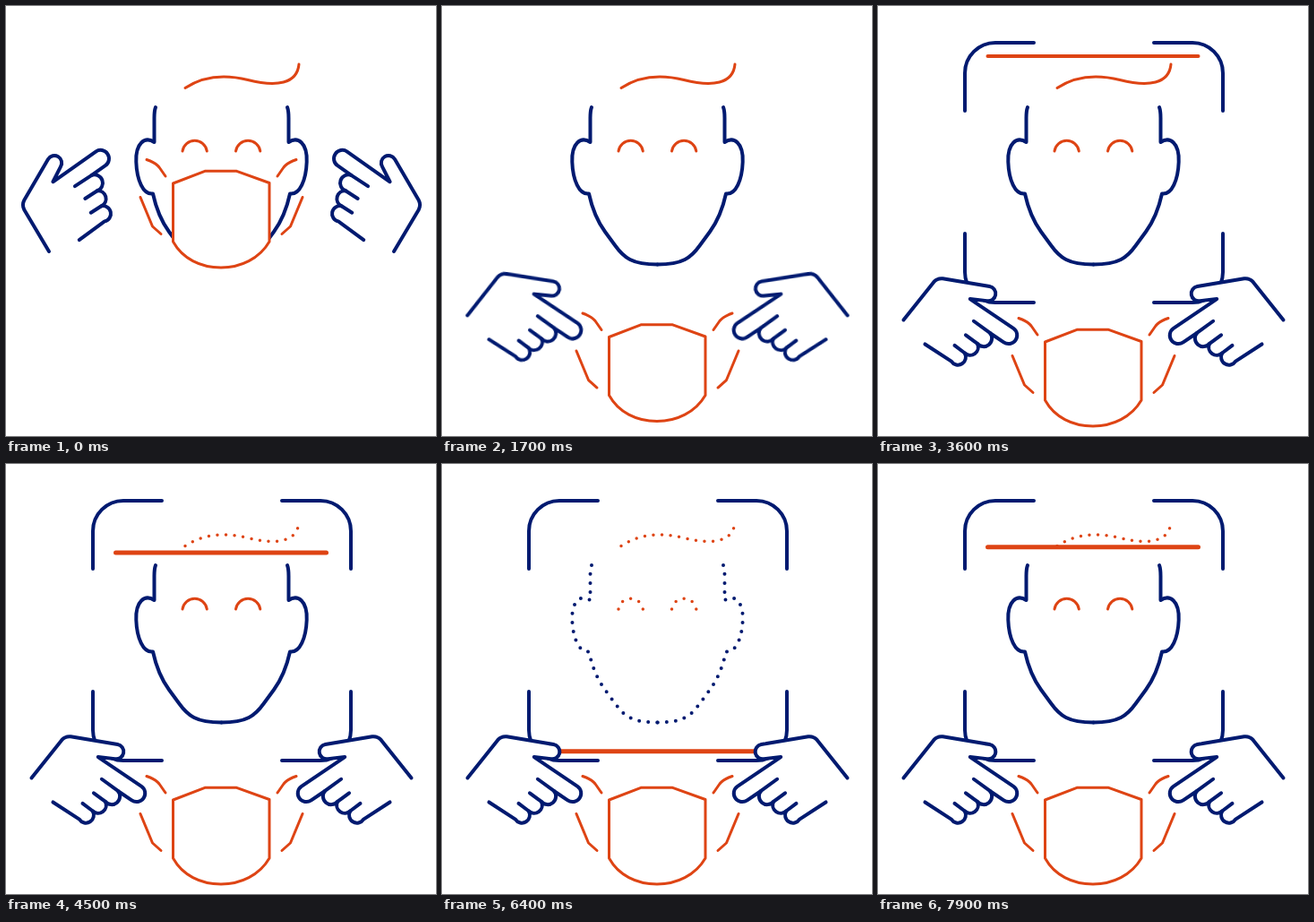
Recreate the animation shown at these times as an HTML page. Size 480x480 px, loop 8 s.

```html
<!DOCTYPE html>
<html lang="en">
<head>
<meta charset="utf-8">
<title>Face scan</title>
<style>
  html, body { margin: 0; width: 100%; height: 100%; overflow: hidden; background: #fff; }
  svg { display: block; width: 100%; height: 100%; }
  .line { fill: none; stroke-linecap: round; stroke-linejoin: round; }
  .navy { stroke: #001a70; stroke-width: 4; }
  .warm { stroke: #de4414; stroke-width: 3; }
  .solid { fill: #fff; }
  .dots * { stroke-dasharray: 0 .999; }
  .dots .warm { stroke-width: 3.500; }
</style>
</head>
<body>
<svg viewBox="0 0 480 480">
  <defs>
    <clipPath id="above"><rect id="aboveBox" width="480" height="56"/></clipPath>
    <clipPath id="below"><rect id="belowBox" width="480" height="480"/></clipPath>

    <path id="half" pathLength="24" d="M167 113Q165.500 117 165.500 125V152C155 145 144.500 153 145.300 174C146 194 153 211 164 209.500C168 228 174 241 182 252L193 267C203 281 212 288.500 240.500 288.500"/>
    <path id="eye" pathLength="4" d="M197 162A13.800 13.800 0 0 1 224.300 162"/>
    <path id="hair" pathLength="14.7" d="M200 91.500C222 77 246 76.500 270 82.500C302 90.500 325 87 327 65"/>
    <g id="face" class="line">
      <g class="navy">
        <use href="#half"/>
        <use href="#half" transform="matrix(-1 0 0 1 481 0)"/>
      </g>
      <g class="warm">
        <use href="#hair"/>
        <use href="#eye"/>
        <use href="#eye" x="59.500"/>
      </g>
    </g>

    <g id="corners">
      <path d="M97 117V75A34 34 0 0 1 131 41H174"/>
      <path d="M97 254V297A34 34 0 0 0 131 331H174"/>
    </g>
    <path id="straps" d="M157 171.500L161 173Q168 176 171 180L178 190M150 213.500L163.500 246L173 254.500"/>
    <path id="arrow" d="M120 155L121 167.500L133 165.500M121 167.500L127.500 159.500"/>
    <g id="hand" class="line navy">
      <path class="solid" d="M28 252L56.500 206Q60 201 66 201L119 203.500A8 8 0 0 1 118 219.800L99 220L151 246.800A9 9 0 0 1 142 263.500L125.500 255A9 9 0 0 1 113 268.500A9 9 0 0 1 100 280.500A8 8 0 0 1 86.500 291.500L55 276"/>
      <path d="M125.500 255L106 244M113 268.500L99 260.500M100 280.500L88 273.500"/>
    </g>
  </defs>

  <rect width="480" height="480" fill="#fff"/>
  <g id="frame" class="line navy">
    <use href="#corners"/>
    <use href="#corners" transform="matrix(-1 0 0 1 482 0)"/>
  </g>
  <g clip-path="url(#below)"><use href="#face"/></g>
  <g clip-path="url(#above)" id="dotted" class="dots"></g>
  <path id="scan" class="line warm" d="M122.500 0H357.500"/>
  <g id="arrows" class="line warm">
    <use href="#arrow"/>
    <use href="#arrow" transform="matrix(-1 0 0 1 481 0)"/>
  </g>
  <g id="mask" class="line warm">
    <path class="solid" d="M186.500 198L222 184.300H257.500L294 197.500V263C283 282 262 292 240 292C217 292 197 282 186.500 263Z"/>
    <use href="#straps"/>
    <use href="#straps" transform="matrix(-1 0 0 1 481 0)"/>
  </g>
  <use id="leftHand" href="#hand"/>
  <g transform="matrix(-1 0 0 1 481 0)"><use id="rightHand" href="#hand"/></g>
</svg>
<script>
const LOOP = 8000, TOP = 56, BOTTOM = 321;
const $ = id => document.getElementById(id);
const set = (id, attrs) => {
  for (const key in attrs) $(id).setAttribute(key, attrs[key]);
};
const mix = (a, b, p) => a + (b - a) * p;
const span = (t, from, to) => Math.min(1, Math.max(0, (t - from) / (to - from)));
const smooth = p => p * p * (3 - 2 * p);

// Cubic bezier easing with control points (x1, 0) and (x2, 1).
function ease(x, x1, x2) {
  let lo = 0, hi = 1;
  for (let i = 0; i < 24; i++) {
    const s = (lo + hi) / 2, r = 1 - s;
    if (3 * x1 * s * r * r + 3 * x2 * s * s * r + s * s * s < x) lo = s;
    else hi = s;
  }
  return smooth(lo);
}

// The dotted face is a real copy, so its own dash rule applies.
const dotted = $('face').cloneNode(true);
dotted.removeAttribute('id');
for (const use of dotted.querySelectorAll('use')) {
  const shape = $(use.getAttribute('href').slice(1)).cloneNode();
  shape.removeAttribute('id');
  if (use.hasAttribute('transform')) shape.setAttribute('transform', use.getAttribute('transform'));
  if (use.hasAttribute('x')) shape.setAttribute('transform', `translate(${use.getAttribute('x')} 0)`);
  use.replaceWith(shape);
}
$('dotted').append(dotted);

function drawHands(t, drop) {
  const grip = smooth(span(t, 0, 620));
  const x = mix(79.4, 96, grip);
  const y = mix(213.7, 181.5, grip) + 177 * drop;
  const angle = mix(-62.5, -4.4, grip) + 11.2 * drop;
  const transform = `translate(${x} ${y}) rotate(${angle}) translate(-96 -252)`;
  set('leftHand', { transform });
  set('rightHand', { transform });
}

function drawFrame(t) {
  const scale = t < 2400
    ? mix(1.25, 0.85, smooth(span(t, 1750, 2400)))
    : mix(0.85, 1, smooth(span(t, 2400, 3300)));
  set('frame', {
    transform: `translate(241 186) scale(${scale}) translate(-241 -186)`,
    opacity: mix(0, 0.58, span(t, 1750, 2400)) + 0.42 * span(t, 2400, 2900)
  });
}

function drawScan(t) {
  const y = t < 6200
    ? mix(TOP, BOTTOM, ease(span(t, 3550, 5850), 0.9, 0.1))
    : mix(BOTTOM, TOP, ease(span(t, 6300, 8700), 0.68, 0.32));
  set('scan', {
    transform: `translate(0 ${y})`,
    opacity: span(t, 3300, 3600),
    style: `stroke-width: ${mix(4, 5, span(t, 3600, 3900))}`
  });
  set('aboveBox', { height: y });
  set('belowBox', { y });
}

function draw(t) {
  const drop = ease(span(t, 800, 2000), 0.325, 0.1);
  set('mask', { transform: `translate(0 ${177 * drop})` });
  set('arrows', { opacity: span(t, 900, 1080) * (1 - span(t, 1300, 1550)) });
  drawHands(t, drop);
  drawFrame(t);
  drawScan(t);
}

const start = performance.now();
function tick() {
  draw((performance.now() - start) % LOOP);
  requestAnimationFrame(tick);
}
tick();
</script>
</body>
</html>
```
